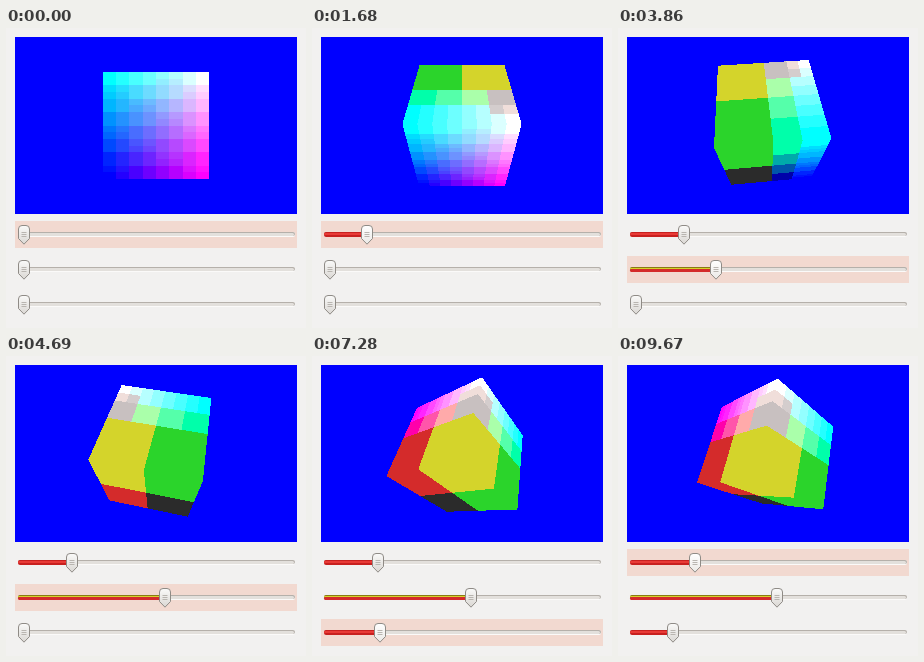
These frames come from a looping animation (300 by 300 pixels, 9700 ms). An HTML page with a canvas:

```html
<!DOCTYPE html>
<html lang="en">
<head>
<meta charset="utf-8">
<title>Colour cube</title>
<style>
  html, body { margin: 0; width: 100%; height: 100%; overflow: hidden; background: #f2f1f0; }
  canvas { position: absolute; left: 9px; top: 9px; background: #00f; image-rendering: pixelated; }
  svg { position: absolute; left: 0; top: 0; }
</style>
</head>
<body>
<canvas id="view" width="282" height="177"></canvas>
<svg id="panel" width="300" height="300" viewBox="0 0 300 300">
  <defs>
    <linearGradient id="knob" x1="0" y1="0" x2="0" y2="1">
      <stop offset="0" stop-color="#fafaf9"/><stop offset="1" stop-color="#dad7d3"/>
    </linearGradient>
    <linearGradient id="knobHover" x1="0" y1="0" x2="0" y2="1">
      <stop offset="0" stop-color="#fff"/><stop offset="1" stop-color="#ebe9e6"/>
    </linearGradient>
  </defs>
</svg>
<script>
const LOOP = 9700, STEP = 40;
const DEG_PER_PX = 1.192;
const W = 282, H = 177, DIST = 5, FOCAL = H / 2 / Math.tan(Math.PI / 8);

// Each drag: start and end time, travel in px, curve power, drawing lag in steps
const sliders = [
  { drags: [{ t0: 1360, t1: 1800, from: 0, to: 48, pow: 1.06, lag: 0 },
            { t0: 9630, t1: 9670, from: 48, to: 59, pow: 1, lag: 0 }],
    hover: [[440, 2230], [8850, LOOP]], focus: [[0, 3240], [9280, LOOP]] },
  { drags: [{ t0: 3500, t1: 4300, from: 0, to: 141, pow: 1.295, lag: 0 }],
    hover: [[2850, 4690]], focus: [[3240, 5730]] },
  { drags: [{ t0: 7120, t1: 7560, from: 0, to: 78, pow: 1.92, lag: 0.7 },
            { t0: 7990, t1: 8470, from: 78, to: 37, pow: 0.866, lag: 0.8 }],
    hover: [[6690, 8730]], focus: [[5730, 9280]] }
];

const inside = (spans, t) => spans.some(([a, b]) => t >= a && t < b);

function travel(slider, t, lagged) {
  let px = 0;
  for (const d of slider.drags) {
    if (t < d.t0) break;
    const count = (d.t1 - d.t0) / STEP + 1;
    let step = Math.min(count, Math.floor((t - d.t0) / STEP) + 1);
    if (lagged && step < count) step -= d.lag;
    px = d.from + (d.to - d.from) * (1 - Math.pow(1 - step / count, d.pow));
  }
  return px;
}

function add(parent, tag, attrs) {
  const el = document.createElementNS("http://www.w3.org/2000/svg", tag);
  for (const key in attrs) el.setAttribute(key, attrs[key]);
  parent.appendChild(el);
  return el;
}

function buildSlider(slider, i) {
  const g = add(panel, "g", { transform: `translate(0 ${193 + 35 * i})` });
  const bar = (y, h, fill, w = 277, x = 12) =>
    add(g, "rect", { x, y, width: w, height: h, rx: Math.min(2, h / 2), fill });
  slider.row = add(g, "rect", { x: 9, y: 0, width: 282, height: 27, fill: "#f2d9d0" });
  bar(11, 5, "#fbfaf9");
  bar(11, 4, "#b5b0aa");
  bar(12, 3, "#e3e0dc", 275, 13);
  slider.fills = i === 1
    ? [bar(11, 4, "#8a7a12"), bar(12, 1, "#d4d42b"), bar(13, 3, "#d42b2b")]
    : [bar(11, 5, "#c8201f"), bar(12, 2, "#e83a36")];
  slider.knob = add(g, "g", {});
  slider.shape = add(slider.knob, "path", {
    d: "M-5.5 8Q-5.5 4.5 -2 4.5H2Q5.5 4.5 5.5 8V17.5L0 23.2L-5.5 17.5Z",
    stroke: "#8f8b86", "stroke-width": 1, "stroke-linejoin": "round"
  });
  add(slider.knob, "path", { d: "M-2.5 11.5H2.5M-2.5 13.5H2.5M-2.5 15.5H2.5", stroke: "#b9b5b0" });
}

// Rotates a pair of coordinates in place
function turn(v, a, b, angle) {
  const c = Math.cos(angle), s = Math.sin(angle), p = v[a];
  v[a] = c * p - s * v[b];
  v[b] = s * p + c * v[b];
}

function toCube(v, [ax, ay, az]) {
  turn(v, 1, 2, -ax);
  turn(v, 2, 0, -ay);
  turn(v, 0, 1, -az);
  return v;
}

// Colour cells get finer towards full blue
function cellColor(r, g, b) {
  const cell = (v, n) => Math.max(0, Math.min(n - 1, Math.floor(v * n)));
  const level = (v, n) => cell(v, n) / (n - 1) * 255;
  if (b < 0.5) return [r < 0.5 ? 43 : 212, g < 0.5 ? 43 : 212, 43];
  const bright = r >= 0.75 && g >= 0.75;
  if (b < 0.75) return bright ? [200, 192, 192] : [level(r, 4), level(g, 4), 170];
  if (bright && b < 0.875) return r < 0.875 ? [212, 205, 205] : [240, 222, 218];
  const fine = (cell(g, 8) + (cell(r, 8) >> 1)) % 3 === 0;
  return [level(r, 8), level(g, fine ? 16 : 8), 255];
}

const ctx = view.getContext("2d");
const image = ctx.createImageData(W, H);
let drawn = "";

function drawCube(angles) {
  const key = angles.join();
  if (key === drawn) return;
  drawn = key;
  const eye = toCube([0, 0, DIST], angles);
  const axes = [[1, 0, 0], [0, 1, 0], [0, 0, 1]].map(v => toCube(v, angles));
  for (let y = 0, n = 0; y < H; y++) {
    for (let x = 0; x < W; x++, n += 4) {
      const dx = x + 0.5 - W / 2, dy = H / 2 - y - 0.5;
      const dir = eye.map((_, k) => axes[0][k] * dx + axes[1][k] * dy - axes[2][k] * FOCAL);
      let near = 0, far = Infinity;
      for (let k = 0; k < 3; k++) {
        const inv = 1 / (dir[k] || 1e-9);
        const a = (-1 - eye[k]) * inv, b = (1 - eye[k]) * inv;
        near = Math.max(near, Math.min(a, b));
        far = Math.min(far, Math.max(a, b));
      }
      const color = near < far
        ? cellColor(...eye.map((e, k) => (e + near * dir[k] + 1) / 2))
        : [0, 0, 255];
      for (let k = 0; k < 3; k++) image.data[n + k] = color[k];
      image.data[n + 3] = 255;
    }
  }
  ctx.putImageData(image, 0, 0);
}

function render(t) {
  for (const s of sliders) {
    const px = Math.round(travel(s, t, false));
    s.row.setAttribute("visibility", inside(s.focus, t) ? "visible" : "hidden");
    s.knob.setAttribute("transform", `translate(${18 + px} 0)`);
    s.shape.setAttribute("fill", inside(s.hover, t) ? "url(#knobHover)" : "url(#knob)");
    for (const f of s.fills) f.setAttribute("width", px ? px + 4 : 0);
  }
  drawCube(sliders.map(s => travel(s, t, true) * DEG_PER_PX * Math.PI / 180));
}

function tick() {
  render(performance.now() % LOOP);
  requestAnimationFrame(tick);
}

const panel = document.getElementById("panel");
sliders.forEach(buildSlider);
tick();
</script>
</body>
</html>
```
